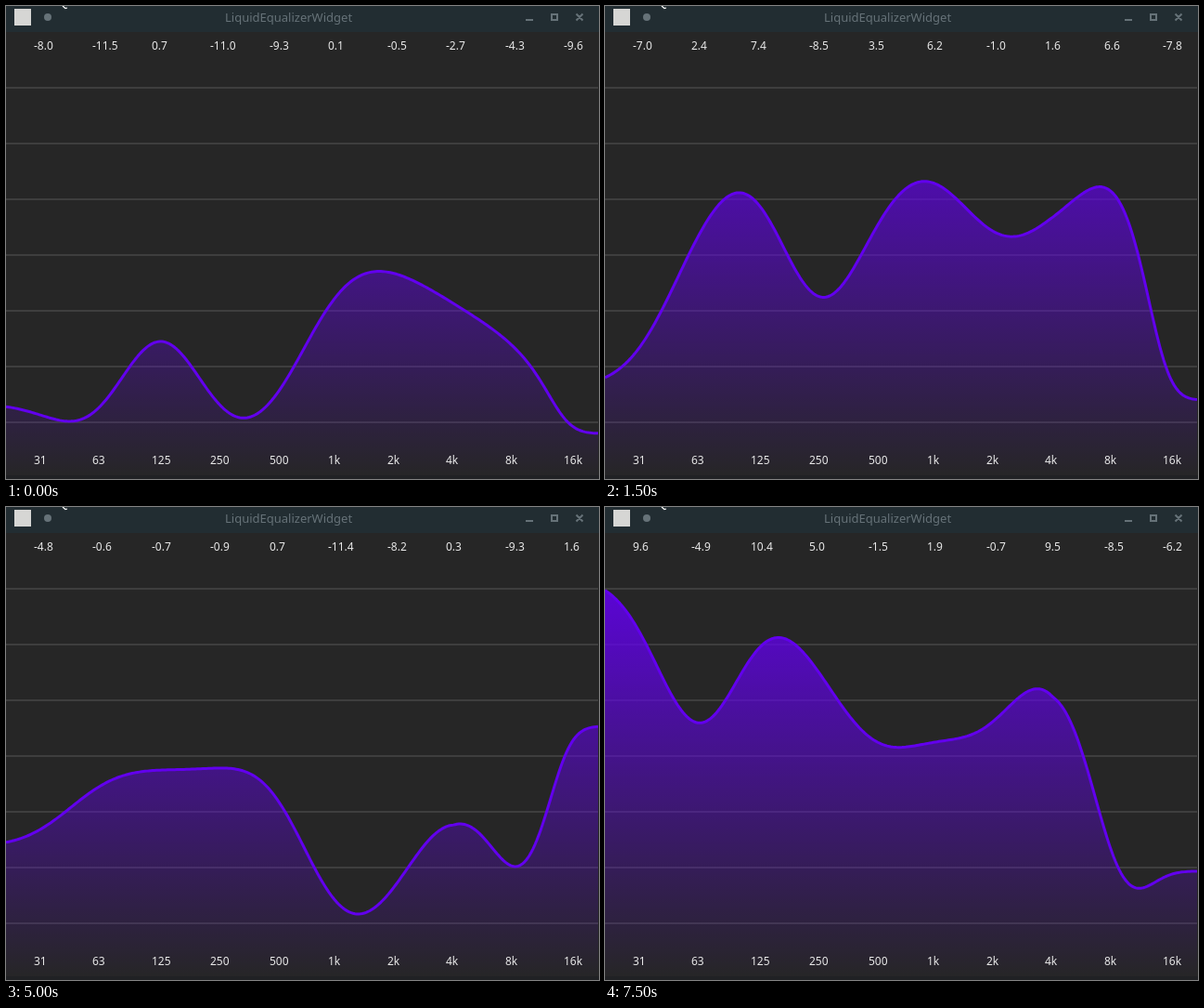
Animation, 639 px wide and 509 px high, one loop 8 s. Source, as an HTML page:

```html
<!DOCTYPE html>
<html lang="en">
<head>
<meta charset="utf-8">
<title>Equalizer</title>
<style>
  html, body { margin: 0; width: 100%; height: 100%; overflow: hidden; background: #262626; }
  svg { display: block; width: 639px; height: 509px; }
  span {
    position: absolute; white-space: pre; color: #e8e8e8;
    font: 12px/17px "Noto Sans", "Open Sans", sans-serif;
  }
  .title { left: 236px; top: 3px; font-size: 13px; line-height: 18px; color: #667278; }
  .control { fill: none; stroke: #667278; stroke-width: 2; }
</style>
</head>
<body>
<svg viewBox="0 0 639 509">
  <defs>
    <linearGradient id="liquid" gradientUnits="userSpaceOnUse" x1="0" y1="28" x2="0" y2="508">
      <stop offset="0" stop-color="#6200ee"/>
      <stop offset="1" stop-color="#6200ee" stop-opacity="0"/>
    </linearGradient>
    <clipPath id="plot"><rect y="28" width="638" height="477"/></clipPath>
  </defs>
  <rect width="639" height="509" fill="#262626"/>
  <path id="grid" stroke="#3e3e3e" stroke-width="2"/>
  <g clip-path="url(#plot)">
    <path id="fill" fill="url(#liquid)"/>
    <path id="line" fill="none" stroke="#6200ee" stroke-width="3" stroke-linejoin="round"/>
  </g>
  <rect y="505" width="639" height="4" fill="#202124"/>
  <rect width="639" height="28" fill="#222d32"/>
  <rect x="9" y="3" width="18" height="18" fill="#d6d6d4"/>
  <circle cx="45" cy="12" r="4" fill="#667278"/>
  <path d="M61 0L64 2.5L66 2" fill="none" stroke="#fff" stroke-width="1.2"/>
  <path class="control" d="M560 15H568M588 9H594V15H588ZM614.5 8.5L621.5 15.5M621.5 8.5L614.5 15.5"/>
</svg>
<span class="title">LiquidEqualizerWidget</span>
<script>
const LOOP = 8000, TICK = 100, EASE = 524;
const WIDTH = 638, ZERO = 268, PX_PER_DB = 20;
const FIRST = 39, GAP = 63.4; // centre of the lowest band, distance between bands
const $ = id => document.getElementById(id);

// Gains in dB; bands from lagFrom upwards start lag ms late.
const states = [
  { gains: [-8, -11.5, 0.7, -11, -9.3, 0.1, -0.5, -2.7, -4.3, -9.6] },
  { at: 900, lagFrom: 8, lag: 51, gains: [-7.049, 2.4, 7.4, -8.5, 3.5, 6.2, -1, 1.6, 6.6, -7.8] },
  { at: 3000, lagFrom: 7, lag: 70, gains: [-4.849, -0.6, -0.7, -0.9, 0.7, -11.4, -8.2, 0.3, -9.3, 1.6] },
  { at: 5000, lagFrom: 8, lag: 60, gains: [11.5, -5.4, 2.2, 0.1, -4.3, 4.8, -11.7, 7.2, -9.9, -4] },
  { at: 7000, lagFrom: 10, lag: 0, gains: [9.6, -4.9, 10.4, 5, -1.5, 1.9, -0.7, 9.5, -8.5, -6.2] }
];
const bands = ["31", "63", "125", "250", "500", "1k", "2k", "4k", "8k", "16k"];

const clamp = (v, lo, hi) => Math.min(hi, Math.max(lo, v));
const easeOut = t => 1 - (1 - clamp(t, 0, 1)) ** 2;

function addLabel(i, top, text) {
  const el = document.createElement("span");
  el.style.left = Math.floor(30 + 63.5 * i) + "px";
  el.style.top = top + "px";
  el.textContent = text;
  document.body.append(el);
  return el;
}

bands.forEach((name, i) => addLabel(i, 480, name));
const readouts = bands.map((_, i) => addLabel(i, 34, ""));

let grid = "";
for (let y = 88; y < 500; y += 60) grid += `M0 ${y}H${WIDTH}`;
$("grid").setAttribute("d", grid);

function gainsAt(time) {
  let n = 1;
  while (n < states.length - 1 && time >= states[n + 1].at) n++;
  const from = states[n - 1].gains, { at, lagFrom, lag, gains } = states[n];
  return gains.map((g, i) => {
    const p = easeOut((time - at - (i >= lagFrom ? lag : 0)) / EASE);
    return from[i] + (g - from[i]) * p;
  });
}

// Gaussian blend of nearby bands, tighter towards the right edge; end bands repeat outwards.
function surface(gains, x) {
  const u = (x - FIRST) / GAP;
  const spread = 0.73 - 0.135 * Math.max(0, u - 7);
  let sum = 0, total = 0;
  for (let i = -4; i < gains.length + 4; i++) {
    const weight = Math.exp(-(((u - i) / spread) ** 2) / 2);
    sum += weight * gains[clamp(i, 0, gains.length - 1)];
    total += weight;
  }
  return ZERO - PX_PER_DB * sum / total;
}

function draw(time) {
  const gains = gainsAt(time);
  readouts.forEach((el, i) => el.textContent = gains[i].toFixed(1).replace(/^-0\.0$/, "0.0"));

  const points = [];
  for (let x = 0; x <= WIDTH; x += 2) points.push(`${x} ${surface(gains, x).toFixed(2)}`);
  const path = "M" + points.join("L");
  $("line").setAttribute("d", path);
  $("fill").setAttribute("d", path + "V508H0Z");
}

const start = performance.now();
let shown = -1;
function frame() {
  const time = Math.floor((performance.now() - start) % LOOP / TICK) * TICK;
  if (time !== shown) draw(shown = time);
  requestAnimationFrame(frame);
}
frame();
</script>
</body>
</html>
```
